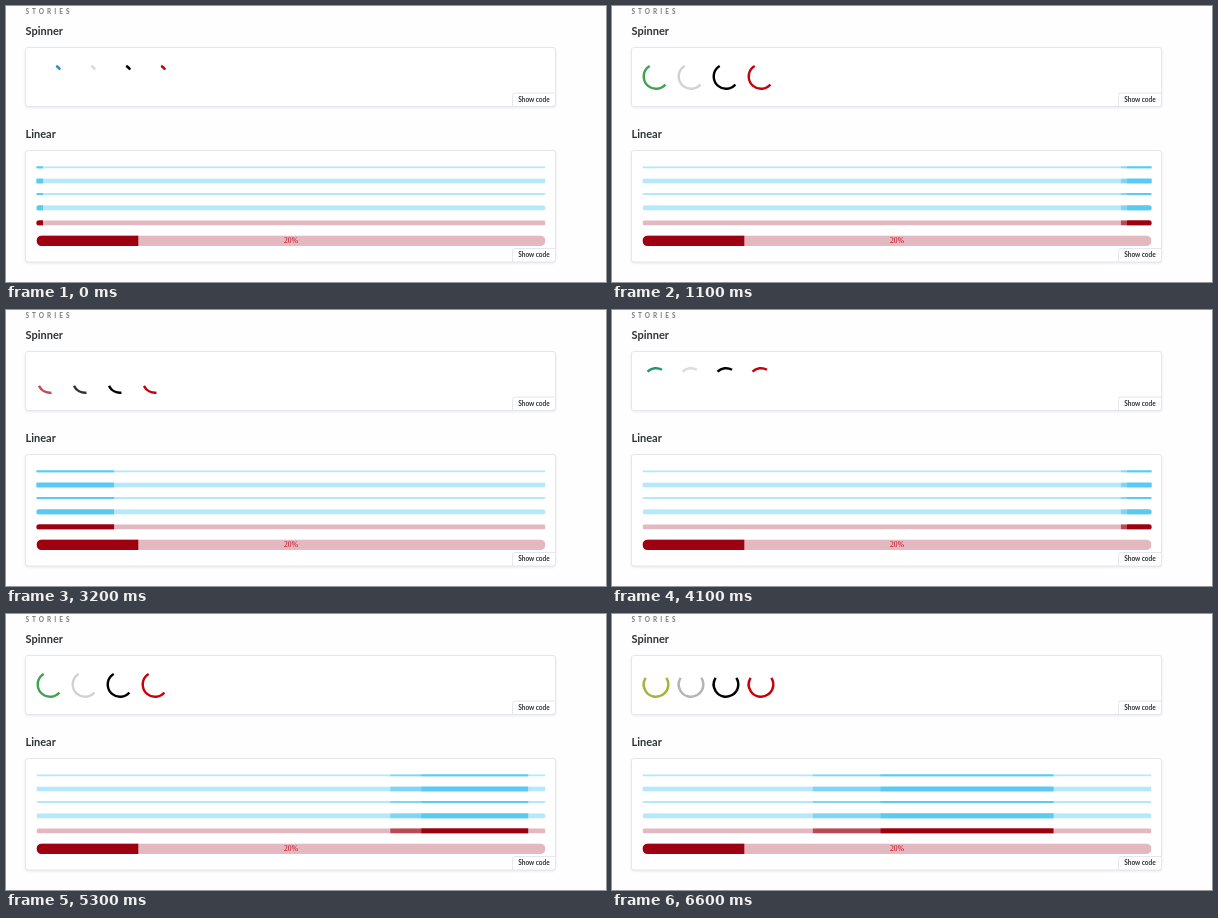
Write an HTML page that moves like this. It is 600 px wide and 276 px high and loops after 6700 ms.

```html
<!DOCTYPE html>
<html lang="en">
<head>
<meta charset="utf-8">
<title>Progress stories</title>
<style>
  html, body { margin: 0; width: 100%; height: 100%; overflow: hidden; background: #fefdff; }
  svg { display: block; width: 100vw; height: 100vh; }
  text { font-family: Lato, "Open Sans", sans-serif; font-weight: 700; fill: #2e3438; }
  .overline { font-size: 6.5px; letter-spacing: 3px; fill: #777b80; }
  .heading { font-size: 11px; }
  .action { font-size: 6.5px; text-anchor: middle; }
  .value { font: 7.6px "Liberation Serif", serif; fill: #d0021b; text-anchor: middle; }
  .panel { fill: #fff; stroke: #e7e6ea; filter: drop-shadow(0 1px 1px rgba(0, 0, 0, .08)); }
  .tab { fill: #fff; stroke: #e7e6ea; }
</style>
</head>
<body>
<svg id="stage" viewBox="0 0 600 276"></svg>
<script>
const LOOP = 6700, STEP = 100;
const SPIN = { period: 1400, shift: -152, x: 44, y: 70.5, gap: 35, scale: 27 / 66, dash: 187 };
const SLIDE = { period: 1500, shift: 104 };
const TRACK = { x: 30.5, width: 509 };
const BLUE = { fill: '#5bcaf3', track: '#b5e8fa' };
const RED = { fill: '#9e0010', track: '#e4b8bf' };

const stage = document.getElementById('stage');

function add(tag, attrs, parent = stage, text = '') {
  const el = document.createElementNS('http://www.w3.org/2000/svg', tag);
  for (const key in attrs) el.setAttribute(key, attrs[key]);
  el.textContent = text;
  parent.appendChild(el);
  return el;
}

function bezier(x1, y1, x2, y2) {
  const at = (a, b, s) => 3 * a * s * (1 - s) ** 2 + 3 * b * s * s * (1 - s) + s ** 3;
  return x => {
    let lo = 0, hi = 1;
    for (let i = 0; i < 24; i++) {
      const mid = (lo + hi) / 2;
      if (at(x1, x2, mid) < x) lo = mid; else hi = mid;
    }
    return at(y1, y2, (lo + hi) / 2);
  };
}
const easeInOut = bezier(.42, 0, .58, 1);
const standard = bezier(.4, 0, .2, 1);
const lerp = (a, b, k) => a + (b - a) * k;
const phase = (t, { period, shift }) => ((t + shift + period) % period) / period;

function cycleColor(colors, u) {
  const i = Math.floor(u * colors.length);
  const k = easeInOut(u * colors.length - i);
  const next = colors[(i + 1) % colors.length];
  return `rgb(${colors[i].map((c, j) => Math.round(lerp(c, next[j], k)))})`;
}

function panel(title, top, bottom) {
  add('text', { class: 'heading', x: 19.5, y: top - 12.5 }, stage, title);
  add('rect', { class: 'panel', x: 19.5, y: top, width: 530, height: bottom - top, rx: 2.5 });
  add('path', { class: 'tab', d: `M506.5 ${bottom}v-11q0 -2.5 2.5 -2.5h40.5v11q0 2.5 -2.5 2.5z` });
  add('text', { class: 'action', x: 528, y: bottom - 4.6 }, stage, 'Show code');
}

const grey = v => [v, v, v];
const palettes = [
  [[66, 133, 244], [222, 62, 53], [247, 194, 35], [27, 154, 89]],
  [grey(219), grey(16), grey(158), grey(220)],
  [grey(0)],
  [[200, 0, 8]]
];

add('text', { class: 'overline', x: 19.5, y: 7.8 }, stage, 'STORIES');
panel('Spinner', 41.5, 100.5);
panel('Linear', 144.5, 256);

const spinners = palettes.map((colors, i) => ({
  colors,
  x: SPIN.x + i * SPIN.gap,
  el: add('circle', { r: 30, fill: 'none', 'stroke-width': 6, 'stroke-dasharray': SPIN.dash })
}));

function track(y, height, rx, color, id) {
  const box = { x: TRACK.x, y, width: TRACK.width, height, rx };
  add('rect', box, add('clipPath', { id }));
  const group = add('g', { 'clip-path': `url(#${id})` });
  add('rect', { ...box, rx: 0, fill: color.track }, group);
  const bar = opacity => add('rect', { x: TRACK.x, y, height, fill: color.fill, opacity }, group);
  return { tail: bar(.6), head: bar(1) };
}

const sliders = [
  [160.3, 2.2, 0, BLUE],
  [172.4, 5.2, 0, BLUE],
  [186.9, 2.2, 1.1, BLUE],
  [199.2, 5.3, 2.6, BLUE],
  [214.3, 5.2, 2.6, RED]
].map((row, i) => track(...row, 'track' + i));

const fixed = track(229.4, 10.6, 5.3, RED, 'fixed');
fixed.head.setAttribute('width', TRACK.width * .2);
add('text', { class: 'value', x: 285, y: 237.4 }, stage, '20%');

function setSpan(el, left, right) {
  el.setAttribute('x', TRACK.x + left * TRACK.width);
  el.setAttribute('width', Math.max(0, right - left) * TRACK.width);
}

function draw(t) {
  const u = phase(t, SPIN);
  const rising = u < .5;
  const k = easeInOut(rising ? u * 2 : u * 2 - 1);
  const angle = 270 * u + (rising ? lerp(0, 135, k) : lerp(135, 450, k));
  const offset = SPIN.dash * (rising ? lerp(1, .25, k) : lerp(.25, 1, k));
  for (const { el, x, colors } of spinners) {
    el.setAttribute('transform', `translate(${x} ${SPIN.y}) scale(${SPIN.scale}) rotate(${angle})`);
    el.setAttribute('stroke-dashoffset', offset);
    el.setAttribute('stroke', cycleColor(colors, u));
  }

  const p = standard(phase(t, SLIDE));
  const right = 1.1 * p;
  for (const { tail, head } of sliders) {
    setSpan(tail, lerp(-1.5, 1, p), right);
    setSpan(head, lerp(-1, 1, p), right);
  }
}

const start = performance.now();
function tick() {
  const t = (performance.now() - start) % LOOP;
  draw(Math.floor(t / STEP) * STEP);
  requestAnimationFrame(tick);
}
tick();
</script>
</body>
</html>
```
